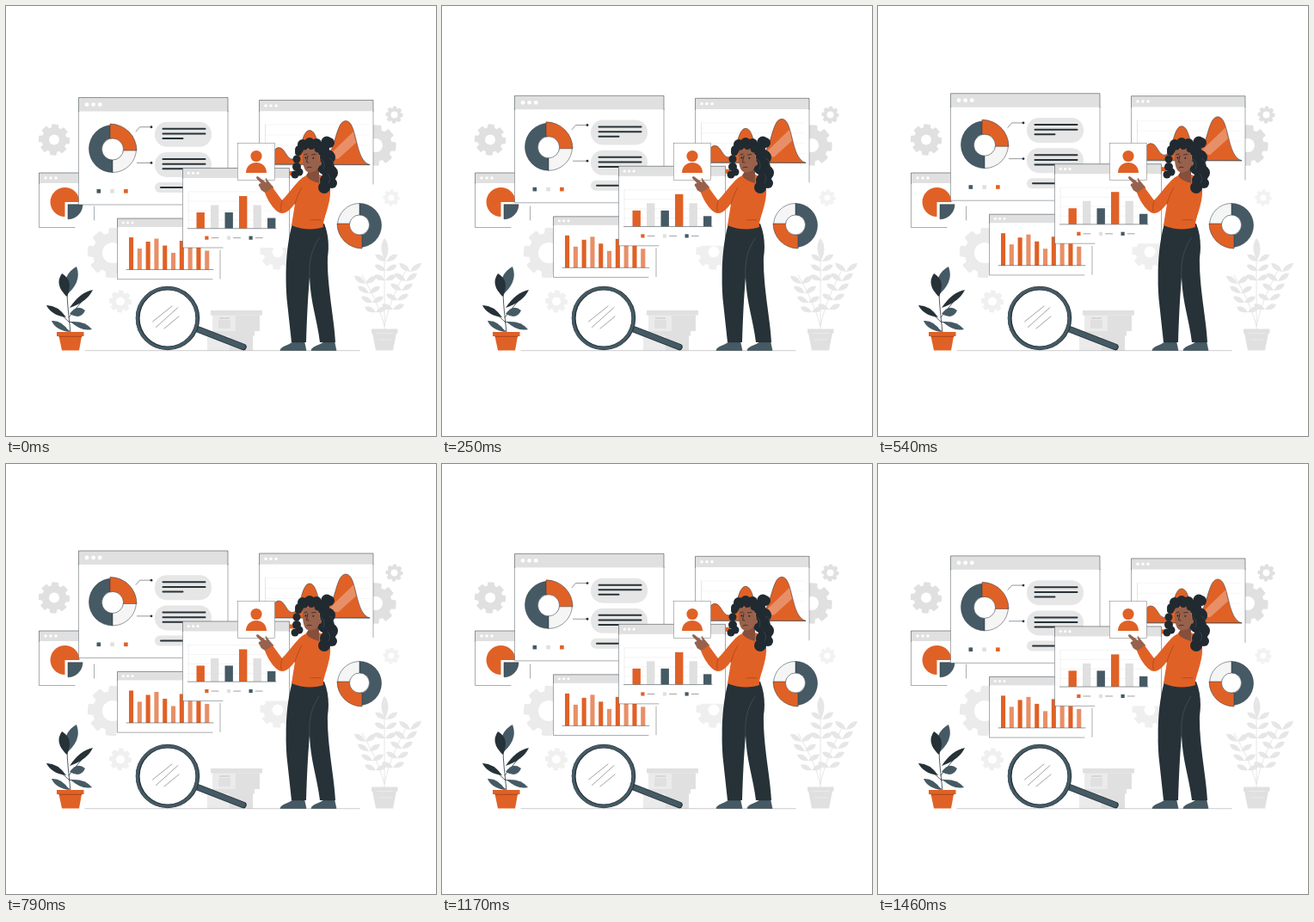
Recreate the animation shown at these times as an HTML page. Size 500 px wide and 500 px high, loop 1.5 s.

```html
<!DOCTYPE html>
<html lang="en">
<head>
<meta charset="utf-8">
<title>Data report</title>
<style>
html, body { margin: 0; width: 100%; height: 100%; overflow: hidden; background: #fff; }
svg { display: block; width: 100%; height: 100%; }
</style>
</head>
<body>
<svg id="stage" viewBox="0 0 500 500"></svg>
<script>
const ORANGE = '#e06126', PEACH = '#e88f67', INK = '#263238', SLATE = '#455a64',
      GREY = '#e0e0e0', PALE = '#ebebeb', SKIN = '#98614c';

const rect = (x, y, w, h, fill, extra = '') =>
  `<rect x="${x}" y="${y}" width="${w}" height="${h}" fill="${fill}" ${extra}/>`;
const circle = (x, y, r, fill, extra = '') =>
  `<circle cx="${x}" cy="${y}" r="${r}" fill="${fill}" ${extra}/>`;
const shape = (d, fill, extra = '') => `<path d="${d}" fill="${fill}" ${extra}/>`;
const line = (d, color = INK, width = 0.5) =>
  `<path d="${d}" fill="none" stroke="${color}" stroke-width="${width}" stroke-linecap="round" stroke-linejoin="round"/>`;
const repeat = (n, f) => Array.from({ length: n }, (_, i) => f(i)).join('');

function gear(x, y, r, hole, color) {
  const tooth = i => rect(x - r * 0.22, y - r, r * 0.44, r, color,
    `rx="${r * 0.07}" transform="rotate(${i * 45 + 4} ${x} ${y})"`);
  return repeat(8, tooth) + circle(x, y, r * 0.8, color) + circle(x, y, hole, '#fff');
}

// Annular sector between two angles in degrees, clockwise from the top
function sector(x, y, r, inner, from, to, fill, extra) {
  const at = (a, q) => `${x + q * Math.sin(a * Math.PI / 180)} ${y - q * Math.cos(a * Math.PI / 180)}`;
  const big = to - from > 180 ? 1 : 0;
  return shape(`M${at(from, r)}A${r} ${r} 0 ${big} 1 ${at(to, r)}L${at(to, inner)}
    A${inner} ${inner} 0 ${big} 0 ${at(from, inner)}Z`, fill, extra);
}

function panel(x, y, w, h, bar, dot, gap, edges) {
  return rect(x, y, w, h, '#fff') + line(edges, INK, 0.4) +
    rect(x, y, w, bar, GREY) + line(`M${x} ${y + bar}V${y}h${w}v${bar}`, INK, 0.5) +
    repeat(3, i => circle(x + gap * (i + 1.25), y + bar / 2, dot, '#fff'));
}

const thin = `stroke="${INK}" stroke-width=".5"`;

function ringReport() {
  const bubble = y => rect(173, y, 66, 29, '#e6e6e6', 'rx="14"') +
    line(`M182.500 ${y + 8}h49M182.500 ${y + 13.700}h49M182.500 ${y + 19.200}h23`, INK, 2);
  return panel(84.5, 106.5, 173.5, 124.5, 16, 2.4, 7.6, 'M84.500 122V231H205M258 122V188') +
    sector(124, 166, 27.5, 12.5, 180, 360, SLATE, thin) +
    sector(124, 166, 27.5, 12.5, 90, 180, '#f5f5f5', thin) +
    sector(121, 168, 31, 14, 0, 90, ORANGE, thin) +
    circle(124, 166.5, 12.5, '#fff', thin) +
    line('M151 146L155.500 140.700H169M152.500 182.400H169') +
    circle(169, 140.7, 1.4, INK) + circle(169, 182.4, 1.4, INK) +
    bubble(134.8) + bubble(170) +
    rect(173, 205, 50, 12, '#e6e6e6', 'rx="6"') + line('M180 211H215', INK, 2) +
    [SLATE, GREY, ORANGE].map((c, i) => rect(105.5 + i * 15.8, 213, 4.6, 4.6, c)).join('');
}

function waveReport() {
  return panel(294.5, 109.5, 132.5, 99, 12.7, 1.7, 6, 'M294.500 122V170M427 122V207') +
    repeat(4, i => line(`M302 ${138 + i * 12}H422`, '#ececec')) + line('M301.500 138V185', '#ccc') +
    shape(`M302 184C309 184 309 164.500 317 164.500C325 164.500 326 179 334 178C343 176 343 144.500 353 144.500
      C363 144.500 362 172 372 173C383 172 383 133.500 395 133.500C409 133.500 405 180 423 184.500Z`, ORANGE, thin) +
    shape('M374 175L404 146L407 159L386 178Z', PEACH) +
    line('M302 184.700H423') + rect(330, 192, 5, 5, ORANGE);
}

function narrowBars() {
  const tops = [269, 282, 274, 270.5, 278.5, 287, 273, 278, 281, 284.5];
  return panel(129.5, 247, 119.5, 70.8, 10, 1.5, 5.4, 'M129.500 257V317.700H240M249 284V317') +
    tops.map((y, i) => rect(143 + i * 9.8, y, 5.1, 306.5 - y, i % 2 ? PEACH : ORANGE)).join('') +
    line('M140 306.500H241');
}

function wideBars() {
  const tops = [240, 231.5, 240, 221, 231.5, 246.5], colors = [ORANGE, GREY, SLATE];
  return panel(205.5, 188.5, 124, 92.5, 11.5, 1.6, 5.4, 'M205.500 200V281H252M329.500 200V278') +
    repeat(4, i => line(`M212 ${216 + i * 11}H314`, '#e8e8e8')) + line('M212 216V258', '#ddd') +
    tops.map((y, i) => rect(221.5 + i * 16.5, y, 9.4, 258.5 - y, colors[i % 3])).join('') +
    line('M211.500 258.700H314') +
    colors.map((c, i) => rect(231.3 + i * 25.6, 267.5, 4.2, 4.2, c) +
      line(`M${239 + i * 25.6} 269.600h8`, '#777', 0.7)).join('');
}

function piePanel() {
  return panel(38.5, 194, 64, 63.5, 12, 1.7, 6, 'M38.500 206V257.500H80M102.500 233V249') +
    sector(68.5, 228, 17, 0, 180, 450, ORANGE) +
    rect(69, 228, 20, 20, '#fff') +
    sector(72, 230.8, 17, 0, 90, 180, SLATE, thin);
}

function sideRing() {
  return sector(411, 255, 25.5, 11.5, 0, 180, SLATE, thin) +
    sector(411, 255, 25.5, 11.5, 270, 360, '#f5f5f5', thin) +
    sector(414, 253, 29, 13, 180, 270, ORANGE, thin) + circle(411, 254.5, 11.5, '#fff', thin);
}

// Leaf from base to tip; bulge is the half-width
function leaf(x, y, tipX, tipY, bulge, color) {
  const dx = tipX - x, dy = tipY - y, n = Math.hypot(dx, dy);
  const bend = s => `${x + dx * 0.6 - s * dy / n * bulge} ${y + dy * 0.6 + s * dx / n * bulge}`;
  return shape(`M${x} ${y}Q${bend(2)} ${tipX} ${tipY}Q${bend(-2)} ${x} ${y}Z`, color);
}

function pottedPlant() {
  return line('M75 380C73 360 71 345 71 330M73 362L95 335M74 368L60 355M74 378L60 370M74 367L90 373', INK, 0.8) +
    leaf(69, 337, 82, 303, 6.5, SLATE) + leaf(71, 338, 65, 311, 6, INK) +
    leaf(74, 351, 101, 330, 3.5, INK) + leaf(70, 362, 47, 348, 3.5, INK) +
    leaf(74, 358, 92, 354, 5, SLATE) + leaf(74, 379, 53, 366, 3.5, SLATE) + leaf(75, 367, 100, 376, 3.5, SLATE) +
    rect(59, 379, 31.5, 5, ORANGE) + shape('M61.500 384H88L85 400.500H65Z', ORANGE) + line('M62 384.300H88', '#8e3b16', 0.7);
}

function palePlant() {
  const pair = (x, y, spread, rise) =>
    leaf(x, y, x - spread, y - rise, 3, '#e6e6e6') + leaf(x, y, x + spread, y - rise, 3, '#e6e6e6');
  const branch = (x, y, lean, n) => repeat(n, i => {
    const px = x + lean * i, py = y - i * 11;
    return pair(px, py, 13, 6 + i);
  });
  return line('M440 376V285M440 372C446 345 456 325 467 303M440 372C434 350 424 330 414 313', GREY, 0.8) +
    branch(441, 319, 0.6, 3) + leaf(441, 296, 440, 270, 4, '#e6e6e6') +
    branch(450, 353, 5, 5) + branch(430, 356, -4, 4) +
    rect(425, 375.5, 30.5, 5, GREY) + shape('M426 380H454L450 400.500H430Z', GREY) +
    line('M431 380.500H450M433 388H448', '#f2f2f2');
}

function boxes() {
  return rect(240, 359, 55, 19, PALE) + rect(238, 354, 60, 5.5, GREY) + rect(248, 362, 12, 2, '#d6d6d6') +
    rect(247, 365, 14, 10, GREY) + rect(267, 360, 28, 18, GREY) +
    rect(234, 383, 53, 17.5, PALE) + rect(232, 378, 57, 5.5, GREY) + rect(260, 383, 27, 17.5, GREY);
}

function magnifier() {
  return line('M222 375.500L276 396.500', INK, 7.5) + line('M222 375.500L275.500 396.200', SLATE, 6) +
    circle(188, 363, 34.8, '#fff', `stroke="${INK}" stroke-width="4.800"`) +
    circle(187.5, 363, 35, 'none', `stroke="${SLATE}" stroke-width="3.400"`) +
    line('M170.500 367L193 349M174.500 373.500L200 350.500M184 375L201 361', '#666', 0.6);
}

function card() {
  return rect(269.5, 159.5, 43, 43, '#fff', `stroke="#777" stroke-width=".5"`) +
    circle(291, 174.5, 6.6, ORANGE) + shape('M279 194C279 178 303 178 303 194Z', ORANGE);
}

function woman() {
  const curls = [[345, 161, 6], [353, 159, 6], [361, 160, 6], [368, 166, 8], [373, 158, 6.5], [341, 167, 5], [374, 176, 9],
    [372, 187, 10], [377, 194, 9], [374, 203, 9], [370, 211, 7], [379, 206, 6], [376, 159, 6]];
  const fringe = [[338, 178, 4.5], [338, 187, 5], [336, 196, 4.5], [341, 193, 4.5], [340, 170, 4]];
  const dots = list => list.map(c => circle(...c, '#202a30')).join('');
  return dots(fringe) +
    shape('M319 400.500C319 396 329 395 333 391H347L349 400.500Z', SLATE, thin) +
    shape('M355 400.500C355 396 365 395 369 391H382L384 400.500Z', SLATE, thin) +
    shape('M333 253C324 285 325 322 327 345L332 391H349C350 360 351 340 353 315C354 345 362 365 365 391H383C382 365 373 325 374 292C376 280 375 265 370 253Z', INK) +
    line('M353 315C352 300 354 285 364 270', '#53636b') +
    shape('M311 211L305 204L302 200L303 206L293 198.500Q290 198 292 201L297 206Q292 207 295 210L297 214Q301 217 305 218Z', SKIN, 'stroke="#70442f" stroke-width=".4"') +
    shape(`M350 197C341 199 331 216 321 226L310 211Q305 215 301 217C305 228 314 241 321 241C328 241 332 234 336 230
      L332 255C345 261 361 260 369 257C368 248 378 231 377 213C377 202 368 196 360 195Z`, ORANGE) +
    line('M336 230C338 223 341 216 344 211M354 249Q361 248 366 249M320 239Q319 233 321 226', '#9b3d15', 0.6) +
    shape('M354 189L364 188V206Q352 203 349 197Z', '#854f3c') + dots(curls) +
    shape('M346 167C351 168 360 164 363 169L365 183C364 191 357 195 351 193C345 191 344 177 346 167Z', SKIN) +
    circle(364, 183, 3, SKIN) +
    line('M351 174L349.500 181.500L352 182M347 173L350 172M355.500 173L360 172.500M350 188Q353 186.500 355 187.500', '#38221b', 0.8) +
    circle(348.5, 176.5, 0.9, '#1d1715') + circle(357.3, 176.8, 0.9, '#1d1715') +
    dots([[347, 163, 4.5], [355, 163, 4], [363, 166, 4.5]]) +
    line('M367 178Q372 183 369 190M374 195Q379 199 375 206M376 177Q382 179 380 185', SLATE, 0.5);
}

document.getElementById('stage').innerHTML =
  gear(56, 155.5, 18, 6, GREY) + gear(451.5, 126.5, 10, 4, GREY) + gear(430, 162, 23.5, 8, GREY) +
  gear(448, 223, 9.5, 3.6, '#f2f2f2') + gear(124, 287, 29, 12, '#ebebeb') +
  gear(133, 343.5, 13, 5, '#f0f0f0') + gear(316, 286, 20.5, 6.5, '#efefef') +
  piePanel() + sideRing() + boxes() + palePlant() +
  `<g id="floating">${ringReport()}${waveReport()}${narrowBars()}${wideBars()}</g>` +
  line('M92 400.700H411', '#aaa', 0.6) + pottedPlant() + magnifier() + card() + woman();

const floating = document.getElementById('floating');
const LOOP = 1500, LEAD = 41.7, RISE = 6.67;

function draw() {
  const phase = ((performance.now() + LEAD) % LOOP) / LOOP;
  const lift = RISE * (1 - Math.abs(2 * phase - 1));
  floating.setAttribute('transform', `translate(0 ${0.4 - lift})`);
  requestAnimationFrame(draw);
}
draw();
</script>
</body>
</html>
```
